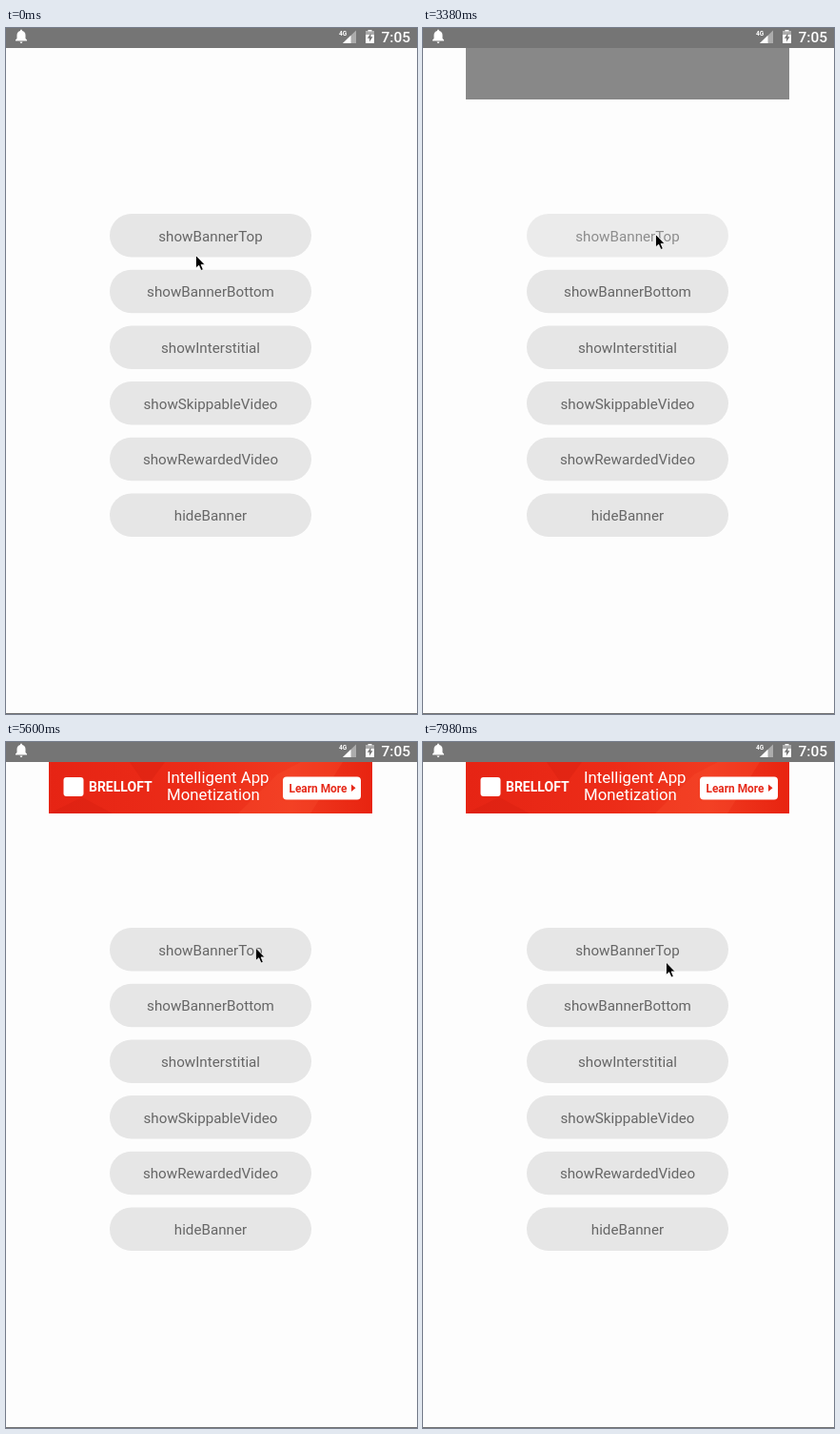
Animation of 432 by 720 pixels, one loop 8 s. Source, as an HTML page:

```html
<!DOCTYPE html>
<html lang="en">
<head>
<meta charset="utf-8">
<title>Banner demo</title>
<style>
  html, body { margin: 0; width: 100%; height: 100%; overflow: hidden; background: #fdfdfd; }
  svg { display: block; width: 100%; height: 100%; font-family: Roboto, sans-serif; }
  #buttons rect { fill: #e6e6e6; }
  #buttons text { font-size: 15.2px; text-anchor: middle; fill: #666; }
</style>
</head>
<body>
<svg viewBox="0 0 432 720">
  <defs>
    <linearGradient id="red">
      <stop offset="0" stop-color="#e62414"/>
      <stop offset=".45" stop-color="#ec2c18"/>
      <stop offset=".75" stop-color="#f03a20"/>
      <stop offset="1" stop-color="#e82410"/>
    </linearGradient>
  </defs>
  <rect width="432" height="720" fill="#fdfdfd"/>
  <rect y="719" width="432" height="1" fill="#757575"/>

  <g id="status" fill="#fff">
    <rect width="432" height="21" fill="#757575"/>
    <path d="M10 13.5V12.5L11.5 11V7.5C11.5 5 13 3.4 15 3V2.2Q16 .8 17 2.2V3C19 3.4 20.5 5 20.5 7.5V11L22 12.5V13.5ZM14.5 14.5H17.5Q16 17.5 14.5 14.5Z"/>
    <text x="350" y="7.5" font-size="6.5" font-weight="700">4G</text>
    <path d="M368 2.5V16H354Z" fill="#acacac"/>
    <path d="M362.5 7.7V16H354Z"/>
    <path d="M380.5 3.5V2H384.5V3.5H387V16H378V3.5Z"/>
    <path d="M378 3.5H387V7H378Z" fill="#acacac"/>
    <path d="M383.5 5.5L379.8 10.8H382V14.5L385.5 9.3H383.5Z" fill="#757575"/>
    <text x="394.5" y="14.8" font-size="15.5" font-weight="500">7:05</text>
  </g>

  <rect id="placeholder" x="45" y="21" width="340" height="54" fill="#888"/>
  <g id="ad" fill="#fff">
    <rect x="45" y="21" width="340" height="54" fill="url(#red)"/>
    <path d="M45 75L80 58L112 75ZM130 21L167 21L148 47Z" fill="#d42010" opacity=".4"/>
    <path d="M244 75L285 34L310 21H354L320 75Z" fill="#f85030" opacity=".3"/>
    <rect x="60.5" y="37" width="21" height="20" rx="3"/>
    <text x="87" y="52.3" font-size="14" font-weight="700">BRELLOFT</text>
    <g font-size="16.8">
      <text x="169" y="43">Intelligent App</text>
      <text x="169" y="61">Monetization</text>
    </g>
    <rect x="291" y="36.5" width="82" height="24" rx="4"/>
    <g fill="#e62a1a">
      <text x="297.5" y="52.5" font-size="11.9" font-weight="700">Learn More</text>
      <path d="M363 44.5L367.5 48.3L363 52Z"/>
    </g>
  </g>

  <g id="buttons"></g>
  <path id="cursor" d="M0 0V13.5L3.2 10.7L5.5 16L7.8 15L5.6 9.9H9.6Z" fill="#000" stroke="#fff" stroke-width=".8"/>
</svg>
<script>
const LOOP = 8000;
const BANNER_OPENS = 3220;
const AD_LOADS = 4340;

const byId = id => document.getElementById(id);
const labels = ['showBannerTop', 'showBannerBottom', 'showInterstitial',
  'showSkippableVideo', 'showRewardedVideo', 'hideBanner'];

byId('buttons').innerHTML = labels.map((label, i) => `
  <g transform="translate(109 ${195 + i * 58.7})">
    <rect width="212" height="45.5" rx="22.75"/>
    <text x="106" y="28.7">${label}</text>
  </g>`).join('');
const pressed = byId('buttons').firstElementChild;

// Each key is [time, ...values].
const cursorPath = [[0, 199.5, 238.5], [1900, 244.5, 216.5], [4600, 244.5, 216.5],
  [5500, 262.5, 216], [7000, 267.5, 216], [7300, 267.5, 216], [7980, 255.5, 231]];
const pressFade = [[2540, 1], [2690, 0.2], [BANNER_OPENS, 0.2], [BANNER_OPENS + 260, 1]];

const smooth = u => u * u * (3 - 2 * u);

function sample(keys, time) {
  const next = keys.findIndex(key => key[0] > time);
  if (next === 0) return keys[0].slice(1);
  if (next < 0) return keys.at(-1).slice(1);
  const [start, ...from] = keys[next - 1];
  const [end, ...to] = keys[next];
  const u = smooth((time - start) / (end - start));
  return from.map((value, i) => value + (to[i] - value) * u);
}

function show(id, visible) {
  byId(id).style.visibility = visible ? 'visible' : 'hidden';
}

function draw() {
  const time = performance.now() % LOOP;
  const [x, y] = sample(cursorPath, time);
  byId('cursor').setAttribute('transform', `translate(${x} ${y})`);
  pressed.setAttribute('opacity', sample(pressFade, time)[0]);
  show('placeholder', time >= BANNER_OPENS && time < AD_LOADS);
  show('ad', time >= AD_LOADS);
  requestAnimationFrame(draw);
}
draw();
</script>
</body>
</html>
```
